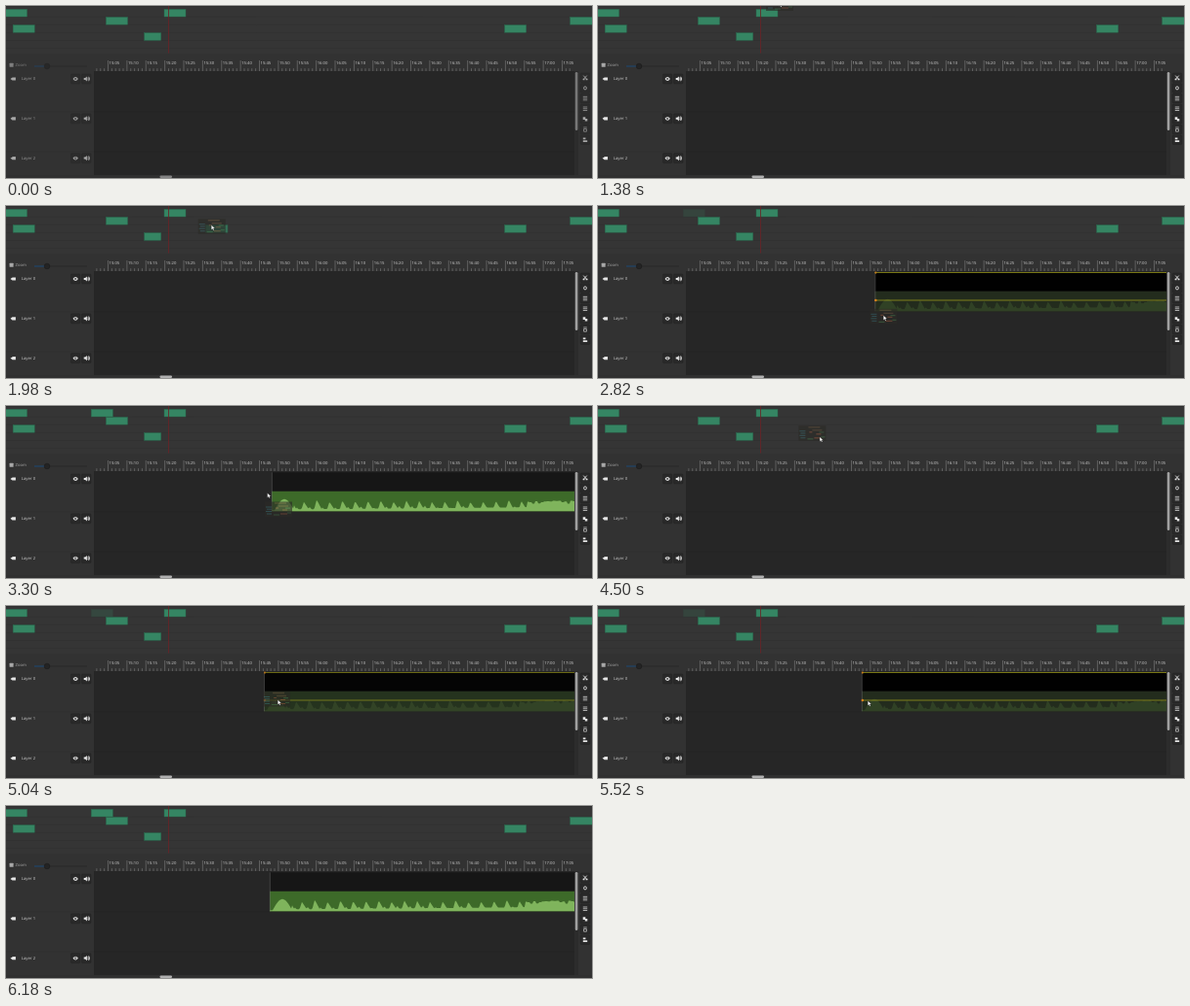
Animation of 600 by 177 pixels, one loop 7.74 s. Source, as an HTML page:

```html
<!DOCTYPE html>
<html lang="en">
<head>
<meta charset="utf-8">
<title>Timeline drag and drop</title>
<style>
  html, body { margin: 0; width: 100%; height: 100%; overflow: hidden; background: #353535; }
  svg { display: block; width: 600px; height: 177px; }
  text { font: 4.2px "Noto Sans", "Open Sans", sans-serif; fill: #c4c4c4; text-rendering: geometricPrecision; }
  .mini { fill: #358563; stroke: #286a4e; stroke-width: .5; }
  .btn { fill: #292929; stroke: #222; stroke-width: .4; }
  .ico { fill: #e6e6e6; }
  .line { fill: none; stroke: #e6e6e6; stroke-width: 1; }
</style>
</head>
<body>
<svg viewBox="0 0 600 177">
  <defs>
    <clipPath id="view"><rect x="90" y="67" width="492" height="107"/></clipPath>
    <g id="camera"><path class="ico" d="M-1.2 -1.6h3.6v3.2h-3.6zM-3 0l2 -1.6v3.2z"/></g>
    <g id="eye">
      <rect class="btn" x="-4.7" y="-5" width="9.4" height="10" rx="1"/>
      <path class="ico" d="M-2.7 0q2.7 -3.8 5.4 0q-2.7 3.8 -5.4 0z"/>
      <circle r="1.1" fill="#292929"/><circle r=".5" class="ico"/>
    </g>
    <g id="speaker">
      <rect class="btn" x="-4.7" y="-5" width="9.4" height="10" rx="1"/>
      <path class="ico" d="M-2.6 -1h1.4l1.8 -1.6v5.2l-1.8 -1.6h-1.4z"/>
      <path class="line" stroke-width=".7" d="M1.5 -1.3q1 1.3 0 2.6M2.4 -2.2q1.6 2.2 0 4.4"/>
    </g>
  </defs>

  <rect width="600" height="177" fill="#353535"/>
  <rect width="600" height="1" fill="#2e2e2e"/>
  <path id="lanes" stroke="#2e2e2e" stroke-width=".5"/>
  <rect y="49.5" width="600" height="1" fill="#313131"/>
  <rect y="51" width="600" height="126" fill="#323232"/>
  <rect x="90" y="67" width="492" height="107" fill="#262626"/>
  <path d="M90 108.7h492M90 149.7h492" stroke="#222" stroke-width=".6"/>
  <path d="M0 108.7h90M0 149.7h90" stroke="#2f2f2f" stroke-width=".6"/>
  <rect x="582" y="67" width="4" height="107" fill="#2c2c2c"/>
  <rect y="174" width="600" height="3" fill="#303030"/>

  <g id="minis"></g>
  <rect id="ghost" class="mini" width="22.5" height="7.6" opacity=".75"/>
  <rect id="newMini" class="mini" x="87.3" width="22" height="7.6"/>
  <path d="M166.5 0v48.5" stroke="#6c2226" stroke-width=".8"/>

  <g id="ruler"></g>

  <g id="widgets">
    <rect x="3.6" y="58.8" width="4" height="4" rx=".5" fill="#a8a8a8"/>
    <text x="9.6" y="62.3" style="fill:#a0a0a0">Zoom</text>
    <path d="M42 62h41" stroke="#282828" stroke-width="1"/>
    <path d="M29 62h13" stroke="#1b4876" stroke-width="1"/>
    <circle cx="42" cy="62" r="2.8" fill="#242424" stroke="#181818" stroke-width=".5"/>
    <rect x="582.8" y="68" width="2.6" height="60" rx="1.2" fill="#a0a0a0"/>
    <rect x="157.5" y="174.4" width="12.5" height="2.6" rx="1.2" fill="#b0b0b0"/>
    <g id="rows"></g>
    <g id="tools"></g>
  </g>

  <g clip-path="url(#view)">
    <g id="clip">
      <rect id="film" width="420" height="19.5" y=".5"/>
      <rect y="20" width="420" height="20.5" fill="#20251c"/>
      <g id="audio">
        <rect y="20" width="420" height="20.5" fill="#3d6a29"/>
        <path class="wave" fill="#7fb45c"/>
      </g>
      <path class="wave" id="faint" fill="#324526"/>
      <path d="M.3 .5v40" stroke="#6c6c6c" stroke-width=".5"/>
      <g id="marks">
        <path d="M0 .7h420M0 29.2h420" stroke="#aaa61c" stroke-width=".8"/>
        <circle cx=".8" cy=".8" r="1.1" fill="#d98a1e"/>
        <circle cx=".8" cy="29.2" r="1.3" fill="#f08a1c"/>
      </g>
    </g>
  </g>

  <g id="thumb" opacity=".62">
    <rect x="-14" y="-8.5" width="28" height="15.5" fill="#2b2a26"/>
    <path d="M-13 -3h6M-12 -.8h5M-13 1.5h6M-12 4h5" stroke="#37666b" stroke-width="1"/>
    <path d="M-4 -7h12M0 -4h10" stroke="#5b4a37" stroke-width="1.3"/>
    <path d="M-3 -2h3M4 0h5M2 4h7" stroke="#86503a" stroke-width="1.2"/>
    <path d="M-5 5h6M7 -1.8h5M9 3h4" stroke="#3f6542" stroke-width="1.2"/>
  </g>
  <path id="cursor" d="M-.8 -2.4v5l1.2 -1.1l.8 1.7l1 -.5l-.8 -1.6h1.6z" fill="#fff" stroke="#111" stroke-width=".35"/>
</svg>

<script>
const LOOP = 7740, STEP = 60;
const $ = id => document.getElementById(id);
const show = (el, on) => el.setAttribute('visibility', on ? 'visible' : 'hidden');
const place = (el, x, y) => el.setAttribute('transform', `translate(${x} ${y})`);
const clamp = v => Math.min(1, Math.max(0, v));
const within = (t, a, b) => t >= a && t < b;
const repeat = (n, f) => Array.from({ length: n }, (_, i) => f(i)).join('');

// Overview clips: [x, row, width]
const rowY = row => 3.4 + 8.1 * row;
$('lanes').setAttribute('d', repeat(5, i => `M0 ${rowY(i) + 7.9}h600`));
$('minis').innerHTML = [[-.5, 0, 22], [102.5, 1, 22], [7.2, 2, 22], [141.7, 3, 17],
  [162, 0, 22], [510.6, 2, 22], [577.7, 1, 23]]
  .map(([x, row, w]) => `<rect class="mini" x="${x}" y="${rowY(row)}" width="${w}" height="7.6"/>`).join('');

// Ruler: a label every five seconds, a tick every second
const second = 19.375 / 5, zero = 104.5;
const clock = s => `${Math.floor(s / 60)}:${String(s % 60).padStart(2, '0')}`;
const ticks = repeat(126, i => `M${zero + (i - 3) * second} ${(i - 3) % 5 ? 64.2 : 56}V67`);
const labels = repeat(25, i => `<text x="${zero + 1 + i * 5 * second}" y="60.1">${clock(905 + 5 * i)}</text>`);
$('ruler').innerHTML = `<path d="${ticks}" stroke="#8c8c8c" stroke-width=".5"/>${labels}`;

$('rows').innerHTML = repeat(3, i => {
  const y = 75 + 40.8 * i;
  return `<use href="#camera" x="7.5" y="${y}"/><text x="15.8" y="${y + 1.2}">Layer ${i}</text>
    <use href="#eye" x="71.2" y="${y}"/><use href="#speaker" x="82.3" y="${y}"/>`;
});

const list = '<path class="line" opacity=".8" d="M-2.5 -2h5M-2.5 0h5M-2.5 2h5"/>';
const tools = [
  '<path class="line" d="M-2 -2.5L2 2M2 -2.5L-2 2"/><path class="ico" d="M-2.6 1h2v1.8h-2zM.8 1h2v1.8h-2z"/>',
  '<circle class="line" r="1.7" stroke-width="1.6"/>',
  list, list,
  '<path class="ico" d="M-2.6 -2.4h3v3h-3zM-.2 -.4h2.8v2.8h-2.8z"/>',
  '<path class="line" opacity=".7" d="M-2 -2.4h4M-1.6 -.6h3.2v3h-3.2z"/>',
  '<path class="ico" d="M-2.5 -2.5h3v2h-3zM-2.5 .6h5v2h-5z"/>'
];
$('tools').innerHTML = tools.map((shape, i) => `<g transform="translate(593 ${73.8 + 10.65 * i})">
  <rect class="btn" x="-4.8" y="-4.8" width="9.6" height="9.6" rx="1"/><g transform="scale(.88)">${shape}</g></g>`).join('');

// Waveform: an opening swell, regular beats with an echo, then a dense passage
const noise = n => Math.abs(Math.sin(n * 12.9898) * 43758.5453) % 1;
function level(x) {
  if (x < 23) return .5 + 11.5 * Math.sin(Math.PI * clamp((x - 3) / 20));
  if (x > 261) return 7 + 3.5 * noise(Math.floor(x / 3));
  const beat = Math.floor((x - 30) / 13.1), u = x - 30 - beat * 13.1;
  const hit = (9 + 2.5 * noise(beat)) * clamp(u < 3 ? u / 3 : 1 - (u - 3) / 6);
  const echo = (3 + 3 * noise(beat + 50)) * clamp(1 - Math.abs(u - 9) / 3);
  return Math.max(1.2 + x / 110, hit, echo);
}
const wave = 'M0 40.5' + repeat(421, x => `L${x} ${(40 - level(x)).toFixed(1)}`) + 'V40.5Z';
document.querySelectorAll('.wave').forEach(el => el.setAttribute('d', wave));

// Pointer stops: [time, x, y]; each move slows down towards its stop
const stops = [[1380, 186, -2], [1980, 211, 22], [2160, 219, 34], [2820, 293, 115], [2940, 279, 107],
  [3240, 279, 107], [3660, 239, 50], [3720, 217, 23], [3960, 206, 16], [4740, 230, 36],
  [5040, 279, 99], [5460, 277, 100], [5880, 277, 100], [6000, 321, 11]];
function pointer(t) {
  const n = stops.findIndex(s => s[0] > t);
  if (n < 1) return stops.at(n).slice(1);
  const [t0, x0, y0] = stops[n - 1], [t1, x1, y1] = stops[n];
  const f = 1 - ((t1 - t) / (t1 - t0)) ** 2;
  const sway = within(t, 4020, 4740) ? 10 * Math.sin((t - 4020) / 720 * Math.PI * 3) : 0;
  return [x0 + (x1 - x0) * f + sway, y0 + (y1 - y0) * f + sway * .6];
}

function draw(t) {
  $('widgets').setAttribute('opacity', clamp(.65 + Math.max(0, t - 60) / 500));

  const [px, py] = pointer(t);
  place($('cursor'), px, py);
  show($('cursor'), within(t, 1380, 6180));
  place($('thumb'), ...pointer(t - STEP));
  show($('thumb'), within(t, 1380, 5520));

  $('ghost').setAttribute('x', px - 6.5);
  $('ghost').setAttribute('y', rowY(2));
  show($('ghost'), within(t, 1860, 2160));

  // The dropped clip trails the pointer and brightens each time it is created
  const on = within(t, 2760, 3420) || t >= 4920;
  const born = t < 4000 ? 2760 : t < 5460 ? 4920 : 5460;
  const p = clamp((t - born) / 300);
  const layer = within(t, 2880, 3300) ? 1 : 0;
  show($('clip'), on);
  show($('newMini'), on);
  place($('clip'), pointer(Math.min(t - 2 * STEP, 5460))[0] - 7, 67.8 + 41 * layer);
  const shade = 22 * p ** 2;
  $('film').setAttribute('fill', `rgb(${shade},${shade},${shade})`);
  $('audio').setAttribute('opacity', p < 1 ? p * .5 : 1);
  $('faint').setAttribute('opacity', p < 1 ? 1 - p : 0);
  $('marks').setAttribute('opacity', p < 1 ? 1 - p * .6 : 0);
  $('newMini').setAttribute('y', rowY(layer));
  $('newMini').setAttribute('opacity', p < 1 ? .15 + .2 * p : 1);
}

const start = performance.now();
function tick() {
  const t = (performance.now() - start) % LOOP;
  draw(Math.floor(t / STEP) * STEP);
  requestAnimationFrame(tick);
}
draw(0);
requestAnimationFrame(tick);
</script>
</body>
</html>
```
